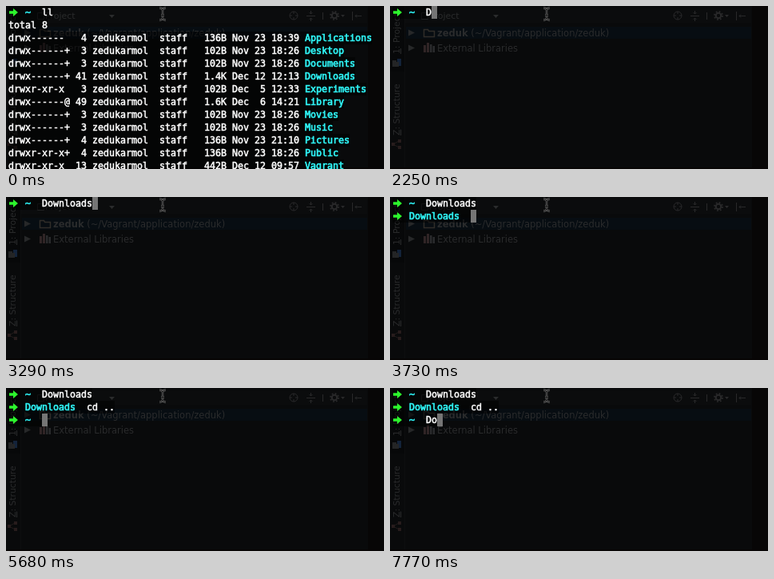
Animation of 473 by 204 pixels, one loop 8 s. Source, as an HTML page:

```html
<!DOCTYPE html>
<html lang="en">
<head>
<meta charset="utf-8">
<title>Terminal session</title>
<style>
html, body { margin: 0; width: 100%; height: 100%; overflow: hidden; background: #090a0b; }
#stage { position: relative; width: 473px; height: 204px; overflow: hidden; }
#stage > svg { position: absolute; left: 0; top: 0; }
.ide text { font: 11.5px "DejaVu Sans", Verdana, sans-serif; fill: #2a2b2c; }
.ide .small { font-size: 11px; }
.ide .side { font-size: 10.8px; }
.ide .u { text-decoration: underline; }
.ide .b { font-weight: bold; }
.row {
  position: absolute; left: 3px; height: 16px; background: rgba(0, 0, 0, .5);
  font: 11.63px/16px "DejaVu Sans Mono", Monaco, monospace;
}
.row span { position: absolute; top: 0; height: 16px; white-space: pre; color: #fff; -webkit-text-stroke: .5px #fff; }
.row .dir { color: #2ff5f7; -webkit-text-stroke: .7px #2ff5f7; }
.row .caret { width: 7px; background: #757575; }
.row svg { position: absolute; left: 0; top: 0; }
</style>
</head>
<body>
<div id="stage">
  <svg class="ide" width="473" height="204">
    <rect width="473" height="204" fill="#090a0b"/>
    <rect width="18" height="82" fill="#070809"/>
    <rect x="19" y="3" width="433" height="18" fill="#0b0c0d"/>
    <path d="M18.500 0V202" stroke="#0d0e0f"/>
    <rect x="20" y="26" width="432" height="15" fill="#070d12"/>
    <rect x="453" width="20" height="204" fill="#070606"/>
    <rect y="202" width="473" height="2" fill="#070505"/>

    <text class="side" transform="translate(12 60) rotate(-90)"><tspan class="u">1</tspan>: Project</text>
    <text class="side" transform="translate(12 162) rotate(-90)"><tspan class="u">Z</tspan>: Structure</text>
    <path d="M3 68h5v2h3v6H3z" fill="#242526"/>
    <path d="M9 66h5v9h-3v-5H9z" fill="#13233a"/>
    <path d="M4 173L11 169M4 173L11 177" stroke="#221b1b" fill="none"/>
    <path d="M2 171h4v4H2zM10 167h4v4h-4zM10 175h4v4h-4z" fill="#271c1c"/>

    <path d="M39.500 8.500h8v8h-8z" fill="none" stroke="#202122"/>
    <text class="small" x="49" y="16">Project</text>
    <path d="M129 11h7l-3.500 4z" fill="#2a2b2c"/>
    <g fill="none" stroke="#29292a">
      <circle cx="360" cy="12" r="5"/>
      <path d="M360 7v3M360 14v3M355 12h3M362 12h3"/>
      <path d="M376 12.500h11M381.500 6v4M379.500 8l2 2 2-2M381.500 19v-4M379.500 17l2-2 2 2"/>
      <path d="M396.500 8v9"/>
      <circle cx="411" cy="12" r="3.200" stroke-width="2"/>
      <circle cx="411" cy="12" r="5" stroke-width="2" stroke-dasharray="1.800 2.130"/>
      <path d="M433.500 7v11M445 12.500h-8M439 10.500l-2 2 2 2"/>
    </g>
    <path d="M419 11h5l-2.500 3z" fill="#29292a"/>

    <path d="M23 29.500l8 4-8 4zM23 48.500l8 4-8 4z" fill="#272829"/>
    <path d="M42.500 29.500h5l1 2h7v7h-13z" fill="none" stroke="#302d28" stroke-width="1.500"/>
    <text x="59" y="38"><tspan class="b">zeduk</tspan> (~/Vagrant/application/zeduk)</text>
    <path d="M42 49h3v9h-3zM46 46h3v12h-3z" fill="#302526"/>
    <path d="M50 48h2.500v10H50zM53.500 50h2.500v8h-2.500z" fill="#2a2b2d"/>
    <text x="59" y="57">External Libraries</text>
  </svg>
  <div id="term"></div>
  <svg width="473" height="204" fill="none">
    <defs>
      <path id="beam" d="M192 2.500q3.500 0 4 2.500q.5-2.500 4-2.500M196 5v10M194 11.500h4M192 17.500q3.500 0 4-2.500q.5 2.500 4 2.500"/>
    </defs>
    <use href="#beam" stroke="#666" stroke-width="2.400"/>
    <use href="#beam" stroke="#111" stroke-width=".9"/>
  </svg>
</div>
<script>
const CELL = 7, LINE = 16, LOOP = 8000;
const term = document.getElementById('term');

// mode, links, size, date, name
const files = [
  ['drwx------', 4, '136B', 'Nov 23 18:39', 'Applications'],
  ['drwx------+', 3, '102B', 'Nov 23 18:26', 'Desktop'],
  ['drwx------+', 3, '102B', 'Nov 23 18:26', 'Documents'],
  ['drwx------+', 41, '1.4K', 'Dec 12 12:13', 'Downloads'],
  ['drwxr-xr-x', 3, '102B', 'Dec  5 12:33', 'Experiments'],
  ['drwx------@', 49, '1.6K', 'Dec  6 14:21', 'Library'],
  ['drwx------+', 3, '102B', 'Nov 23 18:26', 'Movies'],
  ['drwx------+', 3, '102B', 'Nov 23 18:26', 'Music'],
  ['drwx------+', 4, '136B', 'Nov 23 21:10', 'Pictures'],
  ['drwxr-xr-x+', 4, '136B', 'Nov 23 18:26', 'Public'],
  ['drwxr-xr-x', 13, '442B', 'Dec 12 09:57', 'Vagrant']
];

const dirs = ['~', 'Downloads', '~'];
const entered = ['Downloads', 'cd ..'];

// start time, prompt line, text typed so far
const steps = [
  [1500, 0, ''], [2250, 0, 'D'], [2400, 0, 'Dow'], [2690, 0, 'Down'],
  [2840, 0, 'Downl'], [2990, 0, 'Downlo'], [3140, 0, 'Download'], [3290, 0, 'Downloads'],
  [3730, 1, ''], [5080, 1, 'cd'], [5380, 1, 'cd .'], [5530, 1, 'cd ..'],
  [5680, 2, ''], [6880, 2, 'c'], [7480, 2, ''], [7620, 2, 'D'], [7770, 2, 'Do']
];

const arrow = '<svg width="14" height="16"><path d="M1 6.300H6V3L12 8L6 13V9.700H1z" fill="#2df52d"/></svg>';
const cell = (col, text, cls = '') => `<span class="${cls}" style="left:${col * CELL}px">${text}</span>`;
const row = (y, cols, html) =>
  `<div class="row" style="top:${y * LINE}px;width:${cols * CELL}px">${html}</div>`;

function prompt(y, dir, typed, caret) {
  const start = 5 + dir.length, end = start + typed.length;
  return row(y, end, arrow + cell(3, dir, 'dir') + cell(start, typed) +
    (caret ? cell(end, '', 'caret') : ''));
}

function listing() {
  const rows = files.map(([mode, links, size, date, name], i) => {
    const info = mode.padEnd(11) + String(links).padStart(3) +
      ' zedukarmol  staff   ' + size + ' ' + date;
    return row(i + 2, 53 + name.length, cell(0, info) + cell(53, name, 'dir'));
  });
  return prompt(0, '~', 'll', false) + row(1, 7, cell(0, 'total 8')) + rows.join('');
}

function session(line, typed) {
  return dirs.slice(0, line + 1)
    .map((dir, y) => prompt(y, dir, y < line ? entered[y] : typed, y === line))
    .join('');
}

const screens = [listing(), ...steps.map(([, line, typed]) => session(line, typed))];
const origin = performance.now();
let shown = -1;

function draw() {
  const t = (performance.now() - origin) % LOOP;
  const now = steps.filter(([start]) => start <= t).length;
  if (now !== shown) term.innerHTML = screens[shown = now];
  requestAnimationFrame(draw);
}
draw();
</script>
</body>
</html>
```
